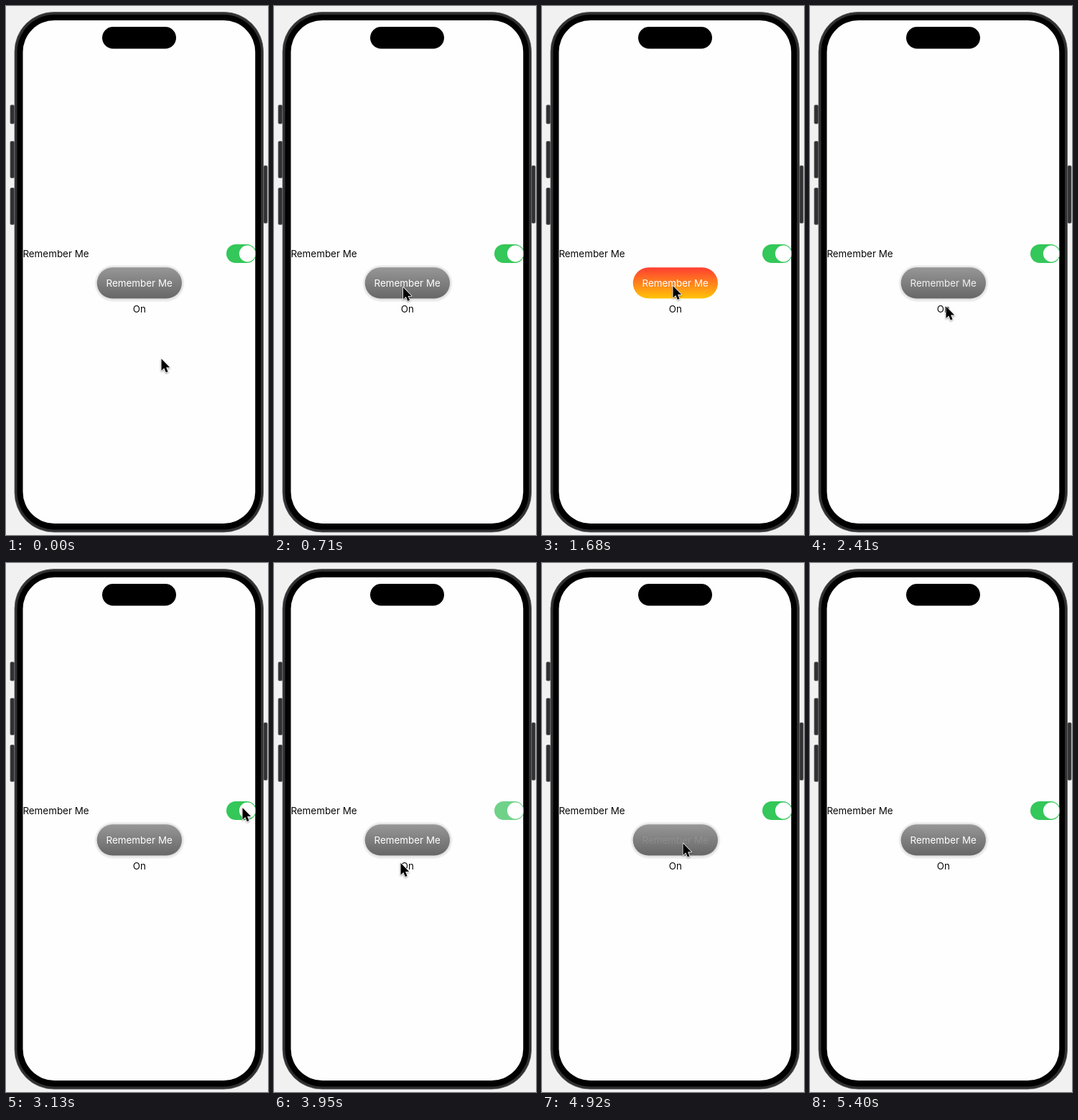
Animation of 365x737 px, one loop 5640 ms. Source, as an HTML page:

```html
<!DOCTYPE html>
<html lang="en">
<head>
<meta charset="utf-8">
<title>Toggle demo</title>
<style>
  html, body { margin: 0; width: 100%; height: 100%; overflow: hidden; background: #f1f1f1; }
  svg { display: block; width: 365px; height: 737px; }
  text { font: 13.4px Inter, Roboto, sans-serif; fill: #0a0a0a; }
  .centered { text-anchor: middle; }
  .soft { filter: blur(.4px); }
  #cursor { filter: drop-shadow(0 1px 1px #0006); }
</style>
</head>
<body>
<svg viewBox="0 0 365 737">
  <defs>
    <linearGradient id="offFill" x2="0" y2="1">
      <stop stop-color="#979797"/><stop offset="1" stop-color="#676767"/>
    </linearGradient>
    <linearGradient id="onFill" x2="0" y2="1">
      <stop stop-color="#ff3e31"/><stop offset="1" stop-color="#ffc408"/>
    </linearGradient>
    <clipPath id="screen"><rect x="23.5" y="20" width="324" height="701" rx="44"/></clipPath>
  </defs>

  <!-- Phone body -->
  <g class="soft">
    <g fill="#303032" stroke="#5c5c5e" stroke-width=".8">
      <rect x="6" y="138" width="5.5" height="26" rx="1.5"/>
      <rect x="6" y="188.5" width="5.5" height="51" rx="1.5"/>
      <rect x="6" y="253.5" width="5.5" height="51" rx="1.5"/>
      <rect x="359" y="222.5" width="5" height="80" rx="1.5"/>
      <rect x="12" y="8.5" width="346.5" height="724.5" rx="55"/>
    </g>
    <rect x="15.5" y="12" width="339.5" height="717.5" rx="52"/>
    <rect x="23.5" y="20" width="323.7" height="701" rx="44" fill="#fefefe"/>
    <rect x="134" y="29" width="103" height="30.5" rx="15.25"/>
  </g>

  <g clip-path="url(#screen)">
    <text x="23.4" y="350">Remember Me</text>
    <g class="soft">
      <rect id="track" x="307" y="332" width="41.5" height="26" rx="13"/>
      <circle id="knob" cy="345" r="11.4" fill="#fff"/>
    </g>
  </g>

  <g class="soft">
    <g id="shadow">
      <rect x="123.5" y="361" width="125" height="51" rx="25.5" fill="#efefef"/>
      <rect x="125.5" y="363" width="121" height="46.5" rx="23.2" fill="#e0e0e0"/>
    </g>
    <rect id="button" x="126.7" y="364.3" width="118.3" height="43.2" rx="21.6"/>
  </g>
  <text id="title" class="centered" x="185.7" y="391" style="fill:#fff">Remember Me</text>
  <text class="centered" x="185.8" y="426.5">On</text>

  <path id="cursor" d="M.5 .5V17L4.3 13.6L6.8 19.6L9.6 18.4L7.1 12.6H12.2Z"
        stroke="#fff" stroke-width="1.6" stroke-linejoin="round" paint-order="stroke"/>
</svg>
<script>
const LOOP = 5640, STEP = 120;

const home = { x: 216, y: 491 };
const moves = [
  { start: 120, steps: 4, x: 172, y: 397 },
  { start: 710, steps: 2, x: 182, y: 389.5 },
  { start: 2170, steps: 3, x: 189, y: 418 },
  { start: 2770, steps: 3, x: 345, y: 337 },
  { start: 3130, steps: 1, x: 329, y: 340.5 },
  { start: 3830, steps: 2, x: 176, y: 417.5 },
  { start: 4070, steps: 2, x: 196, y: 390 },
  { start: 5040, steps: 2, x: 336, y: 752 }
];
const buttonClicks = [1200, 2050, 4560, 4920];
const switchOff = { start: 3370, steps: 2 }, switchOn = { start: 3830, steps: 3 };

const el = id => document.getElementById(id);
const clamp = v => Math.min(1, Math.max(0, v));
const mix = (a, b, k) => a + (b - a) * k;
const smooth = v => v * v * (3 - 2 * v);
const easeOut = v => v * (2 - v);

const progress = (t, { start, steps }) => clamp((Math.floor((t - start) / STEP) + 1) / steps);

function drawButton(t) {
  const clicks = buttonClicks.filter(c => c <= t);
  const on = clicks.length % 2 === 1;
  const fade = clicks.length ? progress(t, { start: clicks.at(-1), steps: 5 }) : 1;
  el('button').setAttribute('fill', on ? 'url(#onFill)' : 'url(#offFill)');
  el('shadow').setAttribute('visibility', on ? 'hidden' : 'visible');
  el('title').setAttribute('opacity', smooth(fade));
}

function drawSwitch(t) {
  const level = 1 - progress(t, switchOff) + progress(t, switchOn);
  const color = [[233, 52], [233, 199], [234, 89]].map(([off, on]) => mix(off, on, level));
  el('track').setAttribute('fill', `rgb(${color})`);
  el('knob').setAttribute('cx', mix(319, 336.3, clamp(level * 1.5)));
}

function drawCursor(t) {
  let { x, y } = home;
  for (const move of moves) {
    const k = easeOut(progress(t, move));
    x = mix(x, move.x, k);
    y = mix(y, move.y, k);
  }
  el('cursor').setAttribute('transform', `translate(${x} ${y})`);
}

const start = performance.now();
function tick() {
  const t = (performance.now() - start) % LOOP;
  drawButton(t);
  drawSwitch(t);
  drawCursor(t);
  requestAnimationFrame(tick);
}
tick();
</script>
</body>
</html>
```
